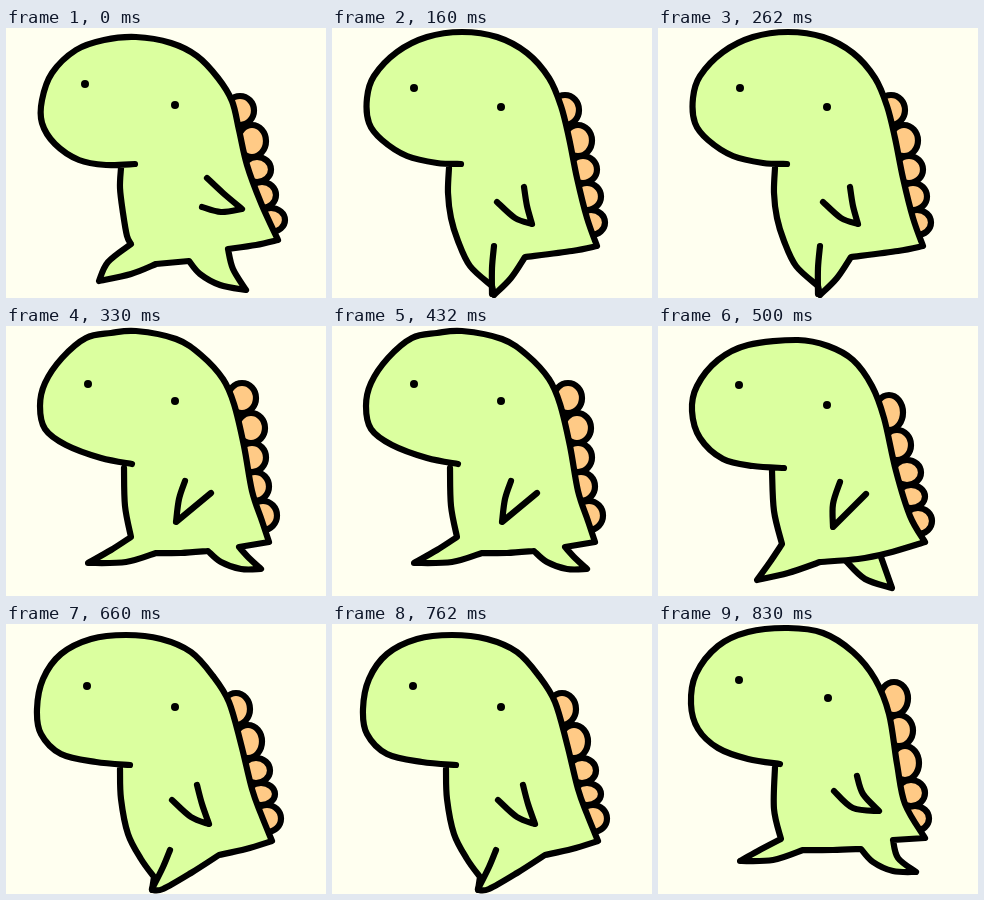
Recreate the animation shown at these times as an HTML page. Size 320 by 270 pixels, loop 1000 ms.

```html
<!DOCTYPE html>
<html lang="en">
<head>
<meta charset="utf-8">
<title>Walking dinosaur</title>
<style>
  html, body { margin: 0; width: 100%; height: 100%; overflow: hidden; background: #fffff0; }
  svg { display: block; width: 100%; height: 100%; }
  .ink { stroke: #000; stroke-width: 6.2; stroke-linecap: round; stroke-linejoin: round; }
  .skin { fill: #dbff9f; }
  .spike { fill: #ffca86; }
  .line { fill: none; }
</style>
</head>
<body>
<svg viewBox="0 0 320 270">
  <path id="farLeg" class="ink skin"/>
  <g id="spikes" class="ink spike"></g>
  <path id="body" class="ink skin"/>
  <path id="lines" class="ink line"/>
  <g id="eyes"></g>
</svg>
<script>
// Curves pass smoothly through their points; "/" marks a sharp corner.
// Spikes: edges run down the back, reach is the right side of each spike.
const poses = [
  {
    at: 0,
    body: "129,136 100,137 73,132 49,116 36,95 36,72 46,45 70,22 98,12 130,9 165,15 191,28 212,50 226,73 233,102 241,137 255,175 272,212 / 250,217 222,221 / 227,241 240,262 / 214,257 194,246 183,233 / 150,236 / 125,246 93,253 / 102,234 125,216 / 121,208 117,185 114,160 115,140",
    lines: ["201,150 217,165 236,181 / 215,184 196,179"],
    edges: [68, 97, 129, 154, 180, 204],
    reach: [251, 263, 268, 273, 282],
    eyes: [79, 56, 169, 77]
  },
  {
    at: 160,
    body: "129,136 105,135 75,128 50,112 37,95 35,70 42,48 65,24 95,9 130,4 165,9 195,25 217,50 229,78 237,110 245,150 255,190 265,218 / 240,223 193,229 / 179,250 162,267 / 160,258 / 138,238 126,213 119,190 116,165 117,140",
    lines: ["192,159 195,178 200,196 / 183,190 165,174", "162,218 160,240 160,266"],
    edges: [67, 97, 128, 155, 182, 207],
    reach: [250, 263, 268, 272, 276],
    eyes: [82, 60, 169, 79]
  },
  {
    at: 330,
    body: "126,138 95,132 60,119 39,103 34,80 39,57 56,32 80,12 105,7 130,5 170,13 195,29 217,53 228,78 238,120 246,165 256,195 263,216 / 233,221 / 243,232 255,243 / 235,243 215,236 202,225 / 175,227 150,227 / 120,236 82,237 / 105,224 125,211 / 119,180 118,142",
    lines: ["179,155 173,173 170,196 / 205,167"],
    edges: [57, 87, 117, 146, 175, 204],
    reach: [253, 262, 263, 266, 274],
    eyes: [82, 58, 169, 75]
  },
  {
    at: 500,
    body: "126,142 95,140 65,133 42,112 34,85 39,60 60,34 90,19 140,14 170,20 195,34 214,60 226,92 238,145 252,190 267,216 / 230,227 200,233 162,236 / 130,247 99,254 / 112,236 124,218 / 116,185 114,145",
    leg: "188,235 207,253 234,262 / 223,231",
    lines: ["182,156 175,178 175,201 / 208,168"],
    edges: [69, 104, 134, 159, 182, 208],
    reach: [248, 256, 266, 270, 277],
    eyes: [81, 59, 169, 79]
  },
  {
    at: 660,
    body: "124,141 90,138 55,130 35,110 31,85 37,55 55,30 85,15 120,11 155,15 185,28 207,52 223,78 235,120 246,165 255,190 266,217 / 240,225 213,231 / 185,249 157,265 146,266 / 148,253 / 135,235 122,210 115,175 114,145",
    lines: ["191,161 196,180 203,200 / 185,193 166,176", "164,226 157,243 146,265"],
    edges: [69, 101, 134, 159, 181, 208],
    reach: [247, 259, 267, 272, 278],
    eyes: [81, 62, 169, 83]
  },
  {
    at: 830,
    body: "122,140 90,135 60,124 40,105 33,80 38,50 60,22 90,8 130,4 165,9 195,28 217,55 231,90 239,140 247,180 267,214 / 235,216 / 240,234 258,248 / 235,247 215,238 203,225 / 175,226 145,226 / 115,236 82,237 / 100,227 123,215 / 116,185 117,143",
    lines: ["199,152 205,170 221,187 / 195,184 176,167"],
    edges: [58, 91, 122, 156, 182, 207],
    reach: [253, 258, 264, 270, 274],
    eyes: [81, 56, 170, 74]
  }
];
const LOOP = 1000;
const el = id => document.getElementById(id);

function curve(text) {
  let d = "", last = null;
  for (const part of text.split(" / ")) {
    const pts = part.split(" ").map(p => p.split(",").map(Number));
    if (last) pts.unshift(last);
    else d = "M" + pts[0];
    for (let i = 1; i < pts.length; i++) {
      const a = pts[i - 1], b = pts[i];
      const before = pts[i - 2] || a, after = pts[i + 1] || b;
      const c1 = a.map((v, k) => v + (b[k] - before[k]) / 6);
      const c2 = b.map((v, k) => v - (after[k] - a[k]) / 6);
      d += `C${c1} ${c2} ${b}`;
    }
    last = pts[pts.length - 1];
  }
  return d;
}

function spike(pose, i) {
  const top = pose.edges[i], bottom = pose.edges[i + 1];
  const rx = 14;
  return `<ellipse cx="${pose.reach[i] - 3 - rx}" cy="${(top + bottom) / 2}" rx="${rx}" ry="${(bottom - top) / 2}"/>`;
}

const eye = (x, y) => `<circle cx="${x}" cy="${y}" r="4"/>`;

function draw(pose) {
  el("farLeg").setAttribute("d", pose.leg ? curve(pose.leg) : "");
  el("spikes").innerHTML = pose.reach.map((_, i) => spike(pose, i)).join("");
  el("body").setAttribute("d", curve(pose.body));
  el("lines").setAttribute("d", pose.lines.map(curve).join(""));
  const [x1, y1, x2, y2] = pose.eyes;
  el("eyes").innerHTML = eye(x1, y1) + eye(x2, y2);
}

let shown = null, start = null;
function tick(now) {
  if (start === null) start = now;
  const t = (now - start) % LOOP;
  const pose = poses.filter(p => p.at <= t).pop();
  if (pose !== shown) draw(shown = pose);
  requestAnimationFrame(tick);
}
draw(shown = poses[0]);
requestAnimationFrame(tick);
</script>
</body>
</html>
```
